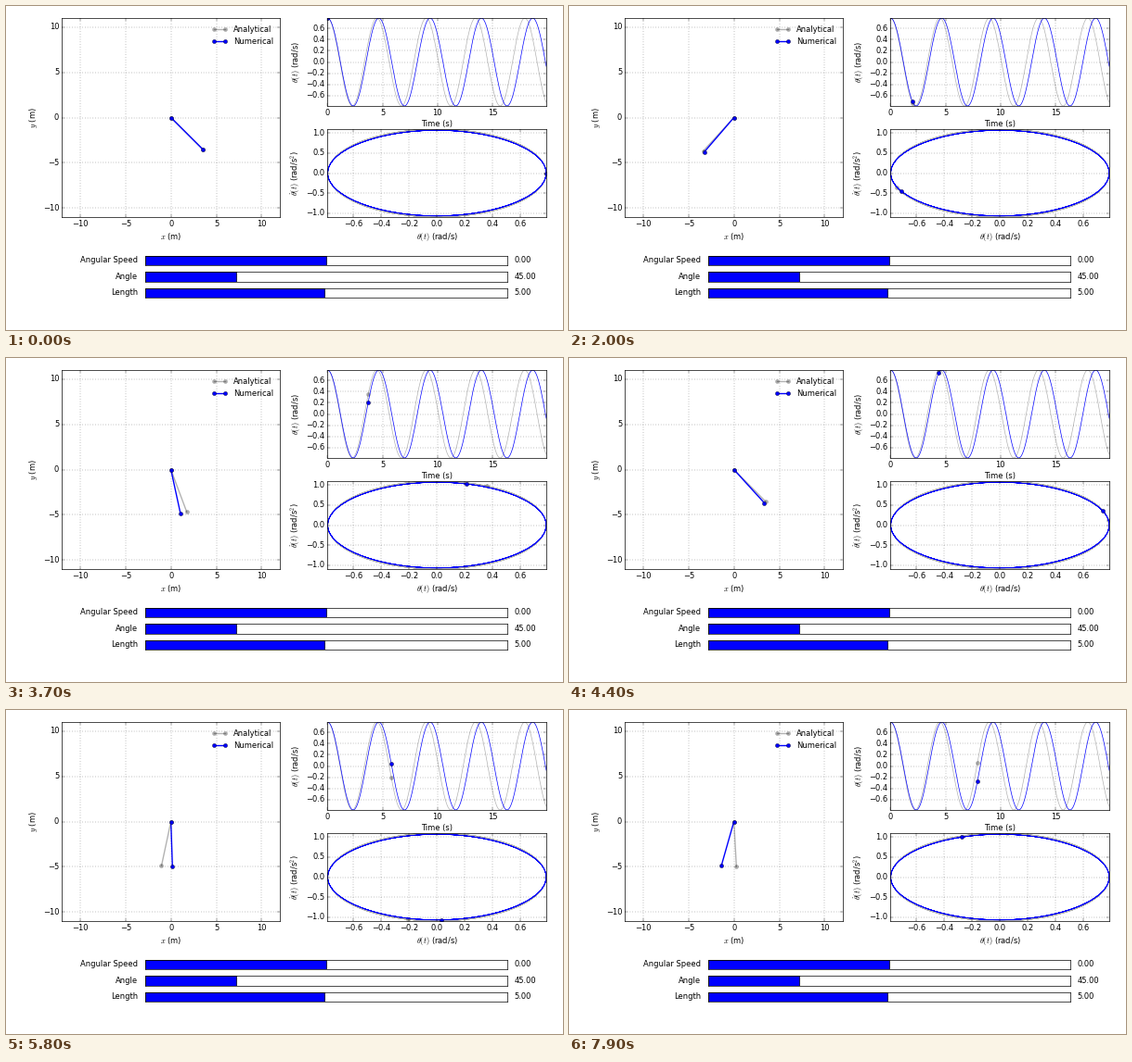
A matplotlib script that plays this animation: 600 px wide and 350 px high, repeating every 8000 ms.

```python
import numpy as np
import matplotlib.pyplot as plt
from matplotlib.animation import FuncAnimation

plt.style.use("classic")
plt.rcParams.update({
    "figure.facecolor": "white",
    "savefig.dpi": "figure",
    "legend.fontsize": 12,
    "font.sans-serif": ["DejaVu Sans"],
})

W, H, DPI = 600, 350, 50
G, LENGTH, ANGLE = 9.81, 5.0, np.radians(45)
DT, STEPS, FRAMES = 0.1, 200, 80
GREY = dict(color="k", alpha=0.3)
BLUE = dict(color="b")


def accel(state):
    theta, speed = state
    return np.array([speed, -G / LENGTH * np.sin(theta)])


def integrate():
    """Full pendulum equation, fourth-order Runge-Kutta."""
    substeps = 5
    h = DT / substeps
    state = np.array([ANGLE, 0.0])
    path = [state]
    for _ in range(STEPS - 1):
        for _ in range(substeps):
            k1 = accel(state)
            k2 = accel(state + h / 2 * k1)
            k3 = accel(state + h / 2 * k2)
            k4 = accel(state + h * k3)
            state = state + h / 6 * (k1 + 2 * k2 + 2 * k3 + k4)
        path.append(state)
    return np.array(path).T


t = np.arange(STEPS) * DT
omega = np.sqrt(G / LENGTH)
analytic = np.array([ANGLE * np.cos(omega * t),
                     -ANGLE * omega * np.sin(omega * t)])
numeric = integrate()

fig = plt.figure(figsize=(W / DPI, H / DPI), dpi=DPI)


def axes_at(left, top, right, bottom):
    """Axes from pixel edges measured from the top left corner."""
    return fig.add_axes([left / W, 1 - bottom / H,
                         (right - left) / W, (bottom - top) / H])


swing = axes_at(60, 13, 295.3, 228)
wave = axes_at(346.4, 13, 582, 108)
phase = axes_at(346.4, 133, 582, 228)

swing.set(xlim=(-12.04, 12.04), ylim=(-11, 11),
          xticks=range(-10, 11, 5), yticks=range(-10, 11, 5))
swing.set_xlabel("$x$ (m)")
swing.set_ylabel("$y$ (m)")

wave.set(xlim=(0, t[-1]), ylim=(-ANGLE, ANGLE),
         xticks=range(0, 20, 5), yticks=np.arange(-3, 4) * 0.2)
wave.set_xlabel("Time (s)")
wave.set_ylabel(r"$\theta(t)$ (rad/s)")

top_speed = ANGLE * omega
phase.set(xlim=(-ANGLE, ANGLE), ylim=(-top_speed, top_speed),
          xticks=np.arange(-3, 4) * 0.2, yticks=np.arange(-2, 3) * 0.5)
phase.set_xlabel(r"$\theta(t)$ (rad/s)")
phase.set_ylabel(r"$\dot{\theta}(t)$ (rad/s$^2$)")

# Fixed label centres, in pixels
for axis, x, y in [(swing.xaxis, 177.5, 249), (swing.yaxis, 29, 120.5),
                   (wave.xaxis, 464, 127.5), (wave.yaxis, 313, 60.5),
                   (phase.xaxis, 464, 249), (phase.yaxis, 312, 180.5)]:
    axis.set_label_coords(x / W, 1 - y / H, transform=fig.transFigure)
    axis.label.set_va("center")

for ax in (swing, wave, phase):
    ax.grid(True)

rods, wave_dots, phase_dots = [], [], []
for label, path, style in [("Analytical", analytic, GREY),
                           ("Numerical", numeric, BLUE)]:
    rods += swing.plot([], [], "o-", lw=2, label=label, **style)
    wave.plot(t, path[0], **style)
    phase.plot(*path, **style)
    wave_dots += wave.plot([], [], "o", **style)
    phase_dots += phase.plot([], [], "o", **style)
swing.legend(loc="upper right", frameon=False)


def slider(bottom, label, value, low, high):
    ax = fig.add_axes([0.25, bottom, 0.65, 0.03])
    ax.set(xlim=(low, high), ylim=(0, 1), xticks=[], yticks=[])
    ax.axvspan(low, value, facecolor="b", edgecolor="k")
    ax.text(-0.02, 0.5, label, transform=ax.transAxes,
            ha="right", va="center")
    ax.text(1.02, 0.5, f"{value:.2f}", transform=ax.transAxes,
            ha="left", va="center")


slider(0.20, "Angular Speed", 0, -10, 10)
slider(0.15, "Angle", 45, 0, 180)
slider(0.10, "Length", 5, 0.1, 10)


def update(i):
    for k, path in enumerate((analytic, numeric)):
        theta, speed = path[:, i]
        rods[k].set_data([0, LENGTH * np.sin(theta)],
                         [0, -LENGTH * np.cos(theta)])
        wave_dots[k].set_data([t[i]], [theta])
        phase_dots[k].set_data([theta], [speed])
    return rods + wave_dots + phase_dots


anim = FuncAnimation(fig, update, frames=FRAMES, interval=100,
                     repeat=True, repeat_delay=0)
plt.show()
```
